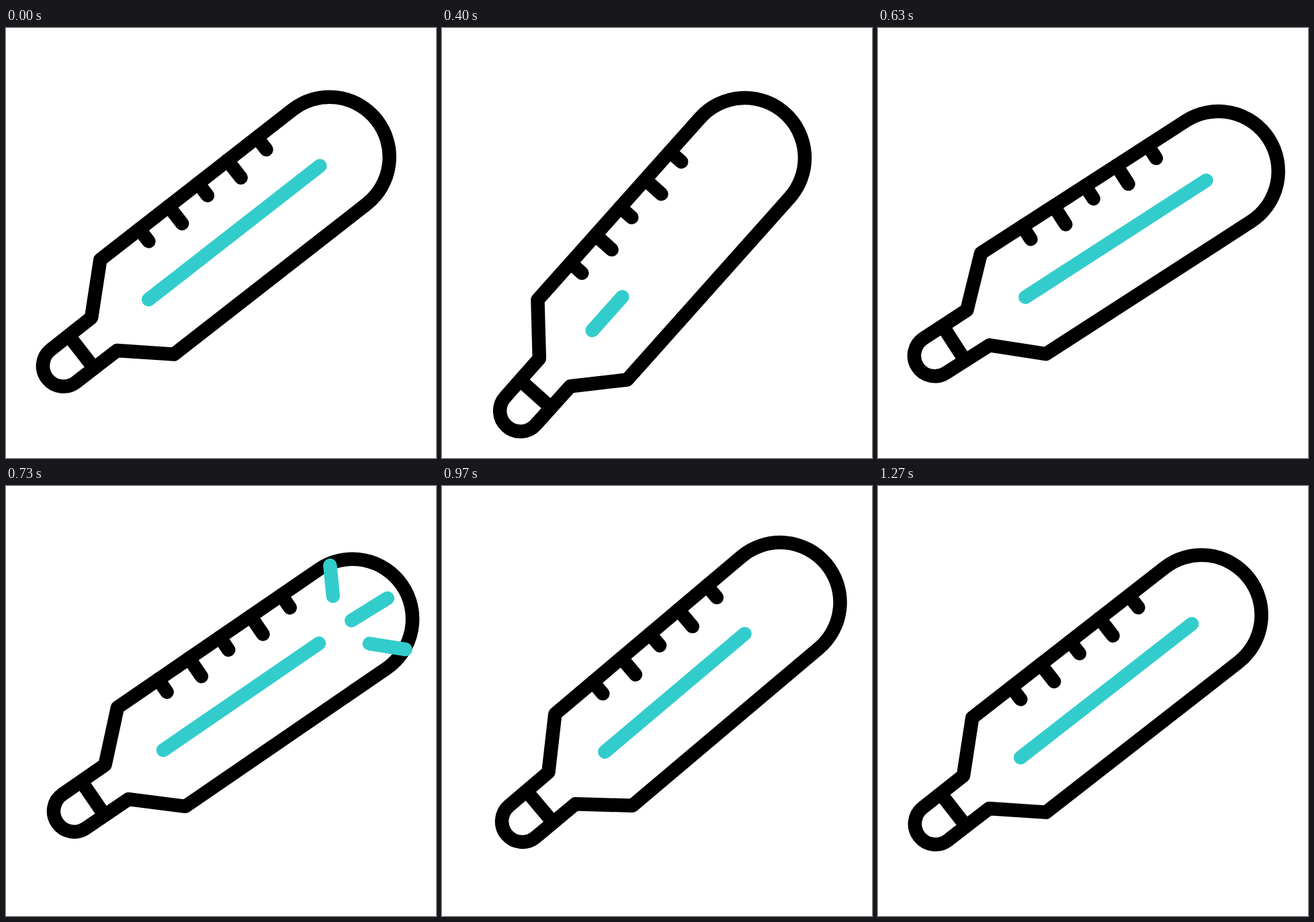
These frames come from a looping animation (640x640 px, 1.67 s). An HTML page:

```html
<!DOCTYPE html>
<html lang="en">
<head>
<meta charset="utf-8">
<title>Thermometer</title>
<style>
  html, body { margin: 0; width: 100%; height: 100%; overflow: hidden; background: #fff; }
  svg { display: block; width: 100vw; height: 100vh; }
  path { fill: none; stroke-width: 20.5; stroke-linecap: round; stroke-linejoin: round; }
  .ink { stroke: #000; }
  .teal { stroke: #33cccc; }
</style>
</head>
<body>
<svg viewBox="0 0 640 640">
  <g id="swing">
    <g id="body">
      <path class="ink" d="M-83.7-31L-20.2-90.9H342.8A89.25 89.25 0 0 1 342.8 87.6H-20.2L-83.7 31L-160.6 30.6A30.6 30.6 0 0 1-160.6-30.6Z"/>
      <path class="ink" d="M-126.7-30V30"/>
      <path class="ink" id="ticks"/>
      <path class="teal" id="fluid"/>
    </g>
    <path class="teal" id="rays"/>
  </g>
</svg>
<script>
const LOOP = 1670, FPS = 30, REST_ANGLE = 37.95, MID = 136.8, FULL = 323.5;
const $ = id => document.getElementById(id);

// Eased 0..1 ramp between two steps of the clock
function ramp(f, from, to) {
  const x = Math.min(1, Math.max(0, (f - from) / (to - from)));
  return x * x * (3 - 2 * x);
}

// Steeper, flatter, a small rebound, then rest
const tilt = f => 10.3 * ramp(f, 3, 12) - 15.6 * ramp(f, 12, 19.5)
                + 7.7 * ramp(f, 19.5, 27.5) - 2.4 * ramp(f, 27.5, 36.5);

// Pulled back, thrust forward, returned
const along = f => -26 * ramp(f, 3, 10.5) + 60.5 * ramp(f, 10.5, 26) - 34.5 * ramp(f, 26, 37.5);
const across = f => 15.2 * ramp(f, 3, 13) - 4.1 * ramp(f, 13, 25) - 11.1 * ramp(f, 25, 36);

// The fluid dips twice, less the second time
const level = f => FULL - 256.5 * (ramp(f, 3, 12) - ramp(f, 12, 19.5))
                        - 106.5 * (ramp(f, 19.5, 25.3) - ramp(f, 25.3, 32.5));

function ray(x, y, angle, length, tail, head) {
  const a = angle * Math.PI / 180;
  const at = p => `${x + length * p * Math.cos(a)} ${y + length * p * Math.sin(a)}`;
  return `M${at(tail)}L${at(head)}`;
}

function burst(f) {
  const head = ramp(f, 19.5, 24), tail = ramp(f, 22, 28);
  if (head <= tail) return '';
  return ray(225.9, -34.6, -61.1, 78.5, tail, head)
       + ray(228, 11, 2.7, 108, tail, head)
       + ray(230.5, 54.5, 43.6, 93, tail, head);
}

let ticks = '';
for (let i = 0; i < 5; i++) ticks += `M${53.5 + i * 55.5}-90.9V${i % 2 ? -58.5 : -68.2}`;
$('ticks').setAttribute('d', ticks);

function draw(f) {
  $('swing').setAttribute('transform', `translate(320 320) rotate(${-REST_ANGLE - tilt(f)})`);
  $('body').setAttribute('transform', `translate(${along(f) - MID} ${across(f)})`);
  $('fluid').setAttribute('d', `M0 0H${level(f)}`);
  $('rays').setAttribute('d', burst(f));
}

const start = performance.now();
function tick() {
  const t = (performance.now() - start) % LOOP;
  draw(Math.floor(t * FPS / 1000 + 0.12));
  requestAnimationFrame(tick);
}
tick();
</script>
</body>
</html>
```
